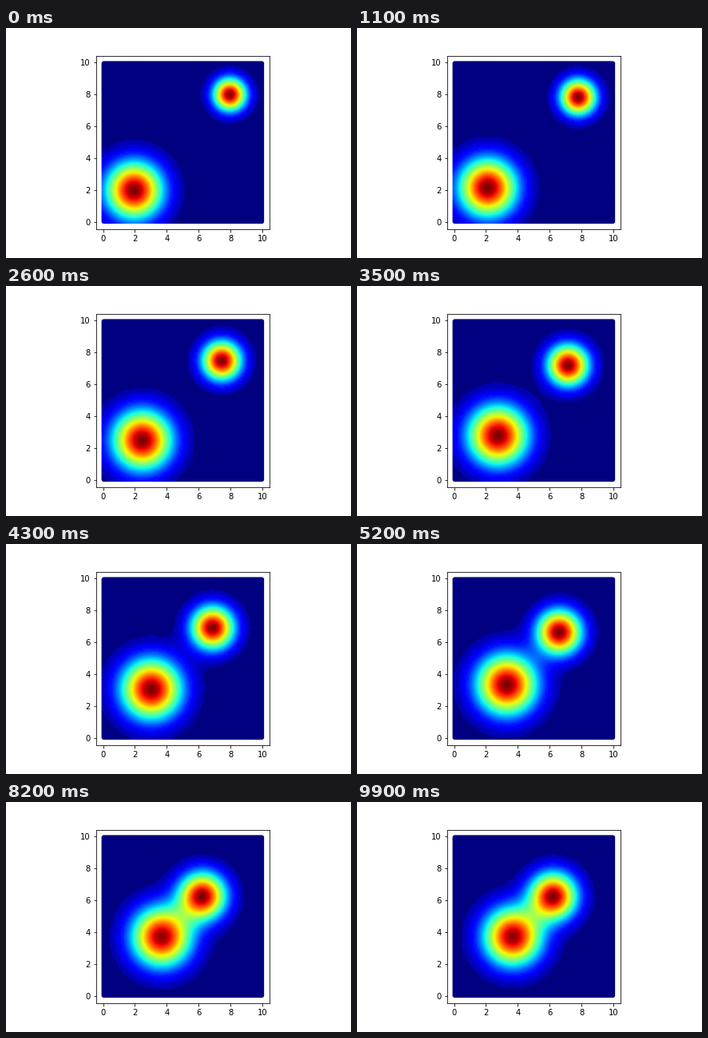
Write a matplotlib script that moves like this. It is 432x288 px and loops after 10000 ms.

```python
import matplotlib.pyplot as plt
import numpy as np
from matplotlib.animation import FuncAnimation
from matplotlib.colors import ListedColormap

FRAMES, INTERVAL = 100, 100
CELLS, SIZE = 100, 10
STEP = SIZE / CELLS


def settle(t, start, end, rate, boost):
    """Slow start that speeds up, then relaxes to the end value."""
    return end + (start - end) * np.exp(-rate * t - boost * t ** 3)


def blob(center, var):
    return np.exp(-((x - center) ** 2 + (y - center) ** 2) / (2 * var))


def field(t):
    """Two Gaussian blobs drawing together along the diagonal."""
    mid = (SIZE + STEP) / 2
    d = settle(t, 3, 1.27, 0.08, 0.0079)
    var_big = 1.5 + 0.17 * np.sin(np.pi * t / 11)
    var_small = settle(t, 0.5, 1.04, 0.15, 0.0048)
    z = blob(mid - d, var_big) + blob(mid + d, var_small)
    return z / z.max()


def banded_jet(bands=31):
    """Jet with visible steps in the dark blues."""
    v = np.linspace(0, 1, 256)
    band = np.floor(v * bands)
    stepped = np.where(band > 0, (band + 0.5) / bands, 0)
    return ListedColormap(plt.get_cmap("jet")(np.where(v < 0.16, stepped, v)))


cells = (np.arange(CELLS) + 0.5) * STEP
x, y = (g.ravel() for g in np.meshgrid(cells, cells, indexing="ij"))

plt.rcParams.update({"font.family": "DejaVu Sans", "font.size": 10})
fig, ax = plt.subplots(figsize=(6, 4), dpi=72)
fig.subplots_adjust(left=0.125, right=0.9, bottom=0.125, top=0.88)
dots = ax.scatter(x, y, c=field(0), s=36, linewidths=0,
                  cmap=banded_jet(), vmin=0, vmax=1)

pad = 0.05 * (cells[-1] - cells[0])
limits = cells[0] - pad, cells[-1] + pad
ticks = range(0, SIZE + 1, 2)
ax.set_aspect("equal")
ax.set(xlim=limits, ylim=limits, xticks=ticks, yticks=ticks)


def update(frame):
    dots.set_array(field(frame * INTERVAL / 1000))
    return (dots,)


anim = FuncAnimation(fig, update, frames=FRAMES, interval=INTERVAL,
                     repeat=True, repeat_delay=0, blit=False)
plt.show()
```
